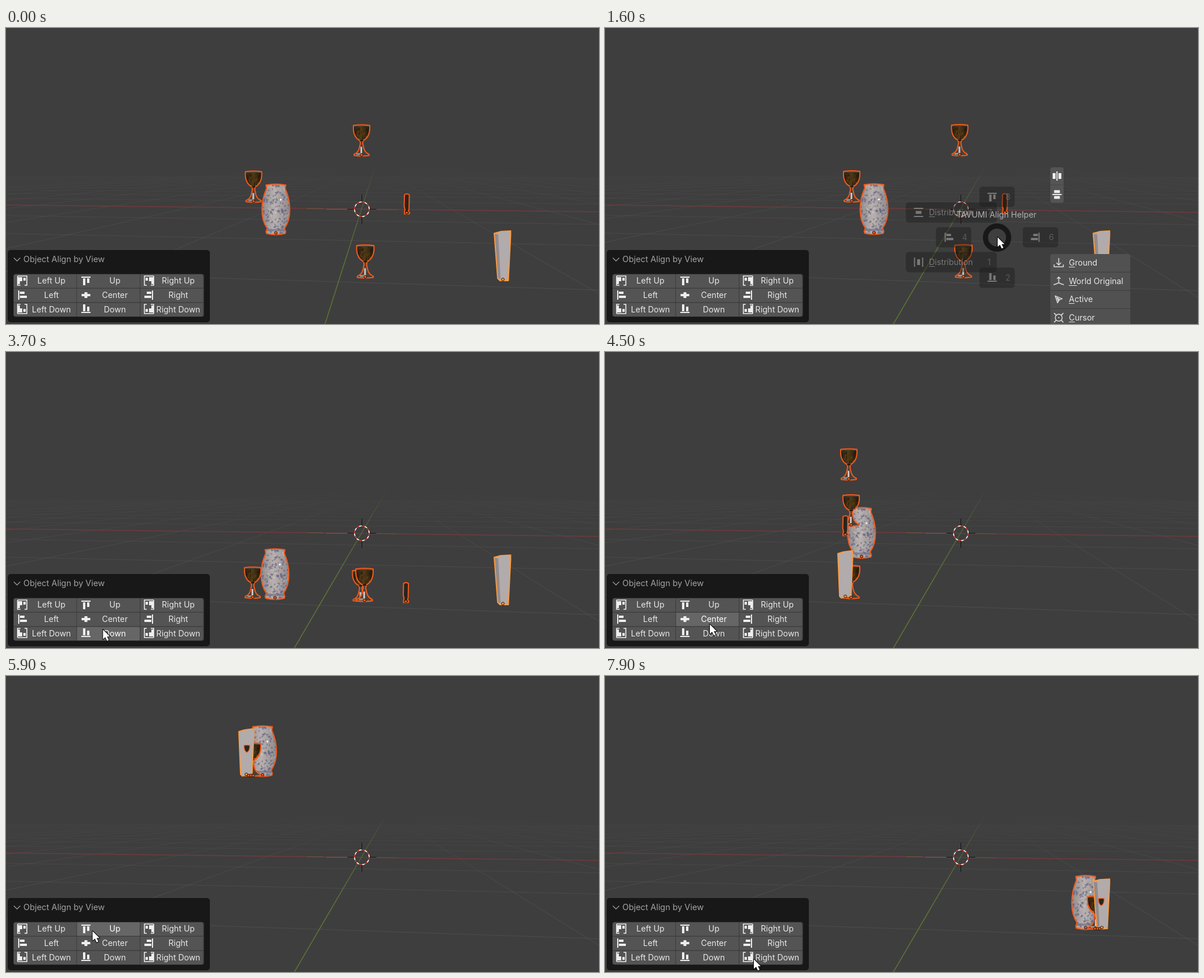
An HTML page with a canvas that plays this animation: 1024x512 px, repeating every 8 s.

```html
<!DOCTYPE html>
<html lang="en">
<head>
<meta charset="utf-8">
<title>Align by view</title>
<style>
html, body { margin: 0; width: 1024px; height: 512px; overflow: hidden; background: #3e3e3e; }
canvas { display: block; }
</style>
</head>
<body>
<canvas id="stage" width="1024" height="512"></canvas>
<script>
const ctx = document.getElementById('stage').getContext('2d');
const LOOP = 8000, STEP = 100, HORIZON = 238;
const ORANGE = '#ee5a1c', ACTIVE = '#ff9a3e';
const lerp = (a, b, k) => a + (b - a) * k;
const clamp = (v) => Math.max(0, Math.min(1, v));
const between = (t, a, b) => t >= a && t < b;

function seeded(seed) {
  return () => (seed = (seed * 16807) % 2147483647) / 2147483647;
}

// ---------- timeline ----------
// Buttons are numbered 0-8 by row, as on the panel.
const visits = [
  { at: 100, x: 753, y: 438 }, { at: 900, x: 677, y: 358 },
  { at: 1300, x: 678, y: 362 }, { at: 1800, x: 678, y: 362 },
  { at: 2200, x: 667, y: 170 }, { at: 2400, x: 667, y: 170 },
  { at: 2900, x: 370, y: 393 }, { at: 3200, x: 181, y: 472 },
  { at: 3400, x: 185, y: 483, button: 7 }, { at: 4200, x: 80, y: 466, button: 3 },
  { at: 4500, x: 181, y: 471, button: 4 }, { at: 5200, x: 290, y: 460, button: 5 },
  { at: 5600, x: 101, y: 441, button: 0 }, { at: 6200, x: 295, y: 442, button: 2 },
  { at: 7100, x: 62, y: 490, button: 6 }, { at: 7700, x: 257, y: 490, button: 8 }
];
const clicks = visits.filter((v) => 'button' in v);
const MENU_OPEN = 1600, MENU_PICK = 2200;

// The cursor rests during a click, then travels on.
function pointerAt(t) {
  if (t < visits[0].at) return null;
  const i = visits.findLastIndex((v) => v.at <= t);
  const from = visits[i], to = visits[i + 1] || from;
  const leave = from.at + ('button' in from ? 200 : 0);
  const k = to === from ? 0 : clamp((t - leave) / (to.at - leave));
  return [lerp(from.x, to.x, k), lerp(from.y, to.y, k)];
}

// ---------- layouts ----------
// Height below the horizon grows towards the right side of the view.
const nearness = (x) => 1 + (x - 427) * 0.00015;
const levelOf = ([x, y]) => (y - HORIZON) / nearness(x);
const atLevel = (x, level) => [x, HORIZON + level * nearness(x)];

// Base points: top cup, left cup, low cup, vase, slim cup, block
const rest = [[612.5, 220], [426, 300], [619, 431], [464.5, 355], [690.5, 320], [858, 437]];
const reach = [6, 10, 10, 28, 0, 0];

function align(button) {
  const col = button % 3, row = Math.floor(button / 3);
  const points = rest.map((p, i) => {
    const x = button === 4 ? 638 : [415 + reach[i], p[0], 858 - reach[i]][col];
    const level = button === 4 ? 92 : [-66, levelOf(p), 187][row];
    return atLevel(x, level);
  });
  return { points, side: col !== 1 && row !== 1 ? 1 - col : 0 };
}
const layouts = [
  { at: 0, points: rest }, { at: MENU_PICK, ...align(1) },
  ...clicks.map((c) => ({ at: c.at + 200, ...align(c.button) })),
  ...[3900, 5000].map((at) => ({ at, points: rest }))
].sort((a, b) => a.at - b.at);

// ---------- basic drawing ----------
function line(x0, y0, x1, y1, color, width = 1) {
  ctx.strokeStyle = color;
  ctx.lineWidth = width;
  ctx.beginPath();
  ctx.moveTo(x0, y0);
  ctx.lineTo(x1, y1);
  ctx.stroke();
}
function box(x, y, w, h, color, radius = 0) {
  ctx.fillStyle = color;
  ctx.beginPath();
  ctx.roundRect(x, y, w, h, radius);
  ctx.fill();
}
function text(str, x, y, color, align = 'left', size = 14) {
  ctx.font = `${size}px Inter, sans-serif`;
  ctx.textAlign = align;
  ctx.fillStyle = color;
  ctx.fillText(str, x, y);
}
function hotkeyText(str, x, y, color) {
  text(str, x, y, color);
  ctx.fillRect(x, y + 2, ctx.measureText(str[0]).width, 1);
}
function place(x, y, sx, sy, draw) {
  ctx.save();
  ctx.translate(x, y);
  ctx.scale(sx, sy);
  draw();
  ctx.restore();
}
function outline(path, color = ORANGE, width = 2) {
  ctx.strokeStyle = color;
  ctx.lineWidth = width;
  ctx.lineJoin = 'round';
  ctx.stroke(path);
}

// ---------- viewport ----------
function drawGrid(cam) {
  const depth = 75, bottom = 512 - HORIZON;
  const slope = lerp(-0.317, -0.583, cam), gap = lerp(2.06, 2.19, cam);
  const vanishX = 614 - slope * depth, tilt = lerp(0.000157, 0.00017, cam);
  const fade = (rgb, a) => {
    const g = ctx.createLinearGradient(0, HORIZON, 0, 400);
    g.addColorStop(0, `rgba(${rgb},0)`);
    g.addColorStop(0.45, `rgba(${rgb},${a * 0.6})`);
    g.addColorStop(1, `rgba(${rgb},${a})`);
    return g;
  };
  const gray = fade('90,90,90', 0.5);
  for (let n = -14; n < 4; n++) {
    const d = 1 / (0.01342 - 0.0028 * n), rise = 512 * d * tilt;
    if (n) line(0, HORIZON + d - rise, 1024, HORIZON + d + rise, gray);
  }
  for (let k = -8; k < 9; k++) {
    if (k) line(vanishX, HORIZON, vanishX + (slope + gap * k) * bottom, 512, gray);
  }
  line(0, 306, 1024, lerp(318, 319, cam), '#6f3a3f', 1.3);
  line(vanishX, HORIZON, vanishX + slope * bottom, 512, fade('94,122,50', 0.9), 1.5);
  line(520, 312.5, 548, 312.8, '#6d5a3a');
  line(553, 313.5, 600, 313.8, '#666');
  line(630, 314, 676, 314.5, '#6d4f38');
}

function drawOriginMark() {
  place(614.5, 313.5, 1, 1, () => {
    for (let i = 0; i < 4; i++) {
      line(11, 0, 25, 0, '#111');
      ctx.rotate(Math.PI / 2);
    }
    for (let i = 0; i < 16; i++) {
      ctx.beginPath();
      ctx.arc(0, 0, 12.7, 0, Math.PI / 8);
      ctx.strokeStyle = i % 2 ? '#fff' : '#e0341e';
      ctx.lineWidth = 1.6;
      ctx.stroke();
      ctx.rotate(Math.PI / 8);
    }
  });
}

// ---------- objects ----------
const vasePath = new Path2D(`M-17-84 Q0-87 17-84 L16-78 C21-67 24-54 24-41 C24-27 20-16 15-9
  L17-3 L16 0 Q0 4-16 0 L-17-3 L-15-9 C-20-16-24-27-24-41 C-24-54-21-67-16-78Z`);
const cupPath = new Path2D(`M-14-52 Q0-54 14-52 C15-39 11-30 3-26 L2-21 L4-12 Q6-5 13-2 L13 0
  Q0 2-13 0 L-13-2 Q-6-5-4-12 L-2-21 L-3-26 C-11-30-15-39-14-52Z`);
const slimPath = new Path2D('M-4-32 Q0-35 4.5-32 L4-8 L3-4 L5-1 L4 1 L-4 1 L-4-3 L-3-6 L-4.5-12Z');
const bowlPath = new Path2D('M-5-6 Q0-7 5-6 Q5 4 0 6 Q-5 4-5-6Z');
const blockPath = {
  left: new Path2D('M-13-76 L-3-79 L12-81 L13-75 L10-4 L-7 1 L-10-2Z'),
  right: new Path2D('M-15-82 L-4-85 L13.5-86 L13.5-78 L9.5 0 L-5 0 L-9-4Z'),
  face: new Path2D('M-14-81 L-8-80 L-4-3 L-9-4Z')
};

const rnd = seeded(77);
const specks = Array.from({ length: 210 }, () => ({
  x: rnd() * 48 - 24, y: rnd() * -84, rx: rnd() * 2 + 0.7, ry: rnd() * 1.5 + 0.5,
  turn: rnd() * 3, color: rnd() < 0.7 ? 'rgba(82,84,124,.5)' : 'rgba(205,198,188,.45)'
}));
const grain = Array.from({ length: 34 }, () => ({
  x: rnd() * 28 - 14, y: rnd() * -24 - 27, h: rnd() * 6 + 1,
  color: rnd() < 0.5 ? 'rgba(126,88,30,.4)' : 'rgba(18,12,6,.5)'
}));

function sideShade(half, edge, middle) {
  const g = ctx.createLinearGradient(-half, 0, half, 0);
  g.addColorStop(0, edge);
  g.addColorStop(0.45, middle);
  g.addColorStop(1, edge);
  return g;
}
function pivot(x, y, color = ORANGE) {
  ctx.beginPath();
  ctx.arc(x, y, 2.4, 0, 7);
  ctx.fillStyle = color;
  ctx.fill();
  ctx.strokeStyle = '#241409';
  ctx.lineWidth = 1;
  ctx.stroke();
}

function drawVase([x, y]) {
  place(x, y, 1, 1 + Math.max(0, x - 500) / 5000, () => {
    ctx.save();
    ctx.clip(vasePath);
    box(-25, -88, 50, 92, sideShade(24, '#908a8c', '#b8b1af'));
    for (const s of specks) {
      ctx.fillStyle = s.color;
      ctx.beginPath();
      ctx.ellipse(s.x, s.y, s.rx, s.ry, s.turn, 0, 7);
      ctx.fill();
    }
    box(-17, -8, 34, 4, 'rgba(90,90,125,.5)');
    box(7, -60, 3, 3, '#fff', 1.5);
    ctx.restore();
    outline(vasePath);
  });
  pivot(x, y - 1);
}

function drawCup([x, y], size = 1) {
  place(x, y, size, size, () => {
    ctx.save();
    ctx.clip(cupPath);
    box(-15, -54, 30, 30, sideShade(14, '#23190d', '#513a17'));
    for (const g of grain) box(g.x, g.y, 1.5, g.h, g.color);
    box(-14, -53, 28, 3, '#4f4434');
    box(-15, -26, 30, 30, '#4a4039');
    box(-2, -15, 3, 13, '#c8c2bd');
    box(-9, -4, 10, 3, '#9a938e');
    ctx.restore();
    outline(cupPath);
    box(-3, -26.5, 6, 1.5, '#15100b');
  });
  pivot(x, y - 1);
}

function drawSmall(path, x, y, width) {
  place(x, y, 1, 1, () => {
    ctx.fillStyle = '#2c241a';
    ctx.fill(path);
    outline(path, ORANGE, width);
  });
}

function drawBlock([x, y]) {
  const path = x < 600 ? blockPath.left : blockPath.right;
  place(x, y, 1, 1, () => {
    ctx.fillStyle = '#b2abab';
    ctx.fill(path);
    ctx.fillStyle = '#918b8c';
    if (x >= 600) ctx.fill(blockPath.face);
    outline(path, ACTIVE, 1.8);
  });
  pivot(x, y - 2, ACTIVE);
}

function drawObjects(t, cam) {
  const { points, side } = layouts.findLast((l) => l.at <= t);
  const drift = 1.5 * (1 - cam);
  const [top, mid, low, vase, slim] = points.map(([x, y]) => [x + drift, y + drift / 3]);
  const block = points[5];
  const vaseInFront = vase[0] - mid[0] > 30;
  if (vaseInFront) drawCup(mid);
  drawVase(vase);
  drawCup(top);
  if (!vaseInFront) drawCup(mid);
  drawCup(low, 1.06);
  if (!side) {
    drawSmall(slimPath, ...slim, 2);
    pivot(slim[0], slim[1] - 1);
  }
  drawBlock(block);
  if (side) {
    const [x, y] = block;
    drawSmall(bowlPath, x + side, y - 46, 1.3);
    for (let d = 4; d <= 12; d += 4) pivot(x + side * d, y);
  }
}

// ---------- icons, centred on a point ----------
// Two blocks resting against a bar; flip chooses the far side.
function alignIcon(x, y, vertical, flip, color = '#eee') {
  place(x, y, vertical ? 1 : flip, vertical ? flip : 1, () => {
    if (vertical) ctx.rotate(Math.PI / 2);
    box(-7, -8, 2, 16, color);
    box(-4, -6, 8, 4, color);
    box(-4, 1, 12, 4, color);
  });
}
// Bars at the given offsets with blocks at others.
function evenIcon(x, y, vertical, barsAt, blocksAt, color = '#eee') {
  place(x, y, 1, 1, () => {
    if (vertical) ctx.rotate(Math.PI / 2);
    for (const p of barsAt) box(p - 1, -8, 2, 16, color);
    for (const p of blocksAt) box(p - 2.5, -5, 5, 10, color);
  });
}
function plusIcon(x, y) {
  box(x - 2.5, y - 5, 5, 10, '#eee');
  box(x - 7.5, y - 2, 15, 4, '#eee');
}
// Solid corner inside a thin frame.
function cornerIcon(x, y, flipX, flipY) {
  place(x, y, flipX, flipY, () => {
    ctx.strokeStyle = '#eee';
    ctx.lineWidth = 1.6;
    ctx.stroke(new Path2D('M-8-8H8V8H4M-8-8V8H-3'));
    box(-8, -6, 8, 7, '#eee');
    box(-8, 0, 4, 6, '#eee');
    box(2, -5, 4, 5, '#eee');
  });
}
const menuMarks = {
  'Ground': 'M0-8V4M-4 0L0 4L4 0M-8 3V7H8V3',
  'World Original': 'M0-7V3M-3-4L0-7L3-4M0 3L-7 6M0 3L7 6M-8 5V7M8 5V7',
  'Active': 'M-6-6L6-1L1 1L-2 6ZM-3-3L1 0L-1 2Z',
  'Cursor': 'M-8-8L-4-4M8-8L4-4M-8 8L-4 4M8 8L4 4M6 0A6 6 0 1 1-6 0A6 6 0 1 1 6 0M-1 0H1M0-1V1'
};

// ---------- tool panel ----------
const labels = ['Left Up', 'Up', 'Right Up', 'Left', 'Center', 'Right', 'Left Down', 'Down', 'Right Down'];

function panelIcon(col, row, x, y) {
  if (col === 1 && row === 1) plusIcon(x, y);
  else if (col === 1) alignIcon(x, y, true, 1 - row);
  else if (row === 1) alignIcon(x, y, false, 1 - col);
  else cornerIcon(x, y, 1 - col, 1 - row);
}

function drawPanel(t, mouse) {
  box(3, 384, 349, 125, '#181818', 5);
  ctx.strokeStyle = '#999';
  ctx.lineWidth = 1.3;
  ctx.stroke(new Path2D('M13.5 397.5L19 403L24.5 397.5'));
  text('Object Align by View', 30, 405, '#a2a2a2', 'left', 14.35);

  const click = clicks.find((c) => between(t, c.at + 100, c.at + 300));
  const pressed = click && t < click.at + 200;
  box(13, 425.5, 329, 74, '#3a3a3a', 4);
  labels.forEach((label, i) => {
    const col = i % 3, row = Math.floor(i / 3);
    const x = 13 + col * 109.5, y = 426 + row * 24.7, w = 108.5, h = 23.5;
    const over = mouse && !click && between(mouse[0], x, x + w) && between(mouse[1], y, y + h);
    const down = pressed && click.button === i;
    const radius = [i === 0, i === 2, i === 8, i === 6].map((on) => on ? 4 : 0);
    box(x, y, w, h, down ? '#4772b3' : over ? '#666' : '#545454', radius);
    panelIcon(col, row, Math.round(x + 15), Math.round(y + 11));
    text(label, 78.5 + col * 109.5, 442 + row * 25, down || over ? '#fff' : '#e8e8e8', 'center');
  });
}

// ---------- radial menu ----------
function pieItem(dx, dy, key, drawIcon, label = '', fill = '#1b1b1b') {
  const w = label ? 157 : 61, x = 677 + dx - w / 2, y = 362 + dy;
  box(x, y - 17.5, w, 35, fill, 5);
  drawIcon(x + 22, y);
  if (label) hotkeyText(label, x + 40, y + 5, '#ddd');
  text(key, x + w - 16, y + 5, '#999');
}

function drawMenu(t) {
  if (!between(t, MENU_OPEN, MENU_PICK)) return;
  const opening = t < MENU_OPEN + STEP, r = opening ? 1 : 2.14;
  ctx.save();
  ctx.globalAlpha = opening ? 0.42 : 1;
  for (const s of [-1, 1]) {
    pieItem(-79 * r, 43 * r * s, s < 0 ? '7' : '1',
      (x, y) => evenIcon(x, y, s < 0, [-7, 7], [0], '#ddd'), 'Distribution');
    pieItem(75 * r * s, 0, s < 0 ? '4' : '6', (x, y) => alignIcon(x, y, false, -s, '#ddd'));
    pieItem(0, 70 * r * s, s < 0 ? '8' : '2', (x, y) => alignIcon(x, y, true, -s, '#ddd'),
      '', s < 0 && t >= 2000 ? '#4772b3' : undefined);
  }
  ctx.restore();

  ctx.strokeStyle = '#181818';
  ctx.lineWidth = 9;
  ctx.beginPath();
  ctx.arc(677, 362.5, 20, 0, 7);
  ctx.stroke();
  text('TAVUMI Align Helper', 676, 328, '#b0b0b0', 'center');

  box(769, 241, 23, 62, '#3c3c3c', 4);
  for (const i of [0, 1]) {
    box(769, 241 + i * 31, 23, 30.5, '#545454', i ? [0, 0, 4, 4] : [4, 4, 0, 0]);
    evenIcon(780.5, 256 + i * 32, i, [0], [-5, 5]);
  }
  box(769, 391, 138, 125, '#3c3c3c', 4);
  Object.entries(menuMarks).forEach(([label, mark], i) => {
    const y = 391 + i * 31.7;
    box(769, y, 138, 30.7, '#515151', i ? 0 : [4, 4, 0, 0]);
    place(783.5, y + 15, 1, 1, () => outline(new Path2D(mark), '#ddd', 1.5));
    hotkeyText(label, 801, Math.round(y + 20), '#e8e8e8');
  });
}

const arrow = new Path2D('M0 0V16.5L4 13L7 19.5L10 18L7 12H12Z');
function drawPointer([x, y]) {
  place(x, y, 1, 1, () => {
    outline(arrow, '#000', 2);
    ctx.fillStyle = '#fff';
    ctx.fill(arrow);
  });
}

function render(now) {
  const t = Math.floor((now % LOOP) / STEP) * STEP;
  const cam = clamp((t - 900) / 400);
  const mouse = pointerAt(t);
  box(0, 0, 1024, 512, '#3e3e3e');
  drawGrid(cam);
  drawObjects(t, cam);
  drawOriginMark();
  drawPanel(t, mouse);
  drawMenu(t);
  if (mouse) drawPointer(mouse);
}

const start = performance.now();
function tick() {
  render(performance.now() - start);
  requestAnimationFrame(tick);
}
tick();
</script>
</body>
</html>
```
